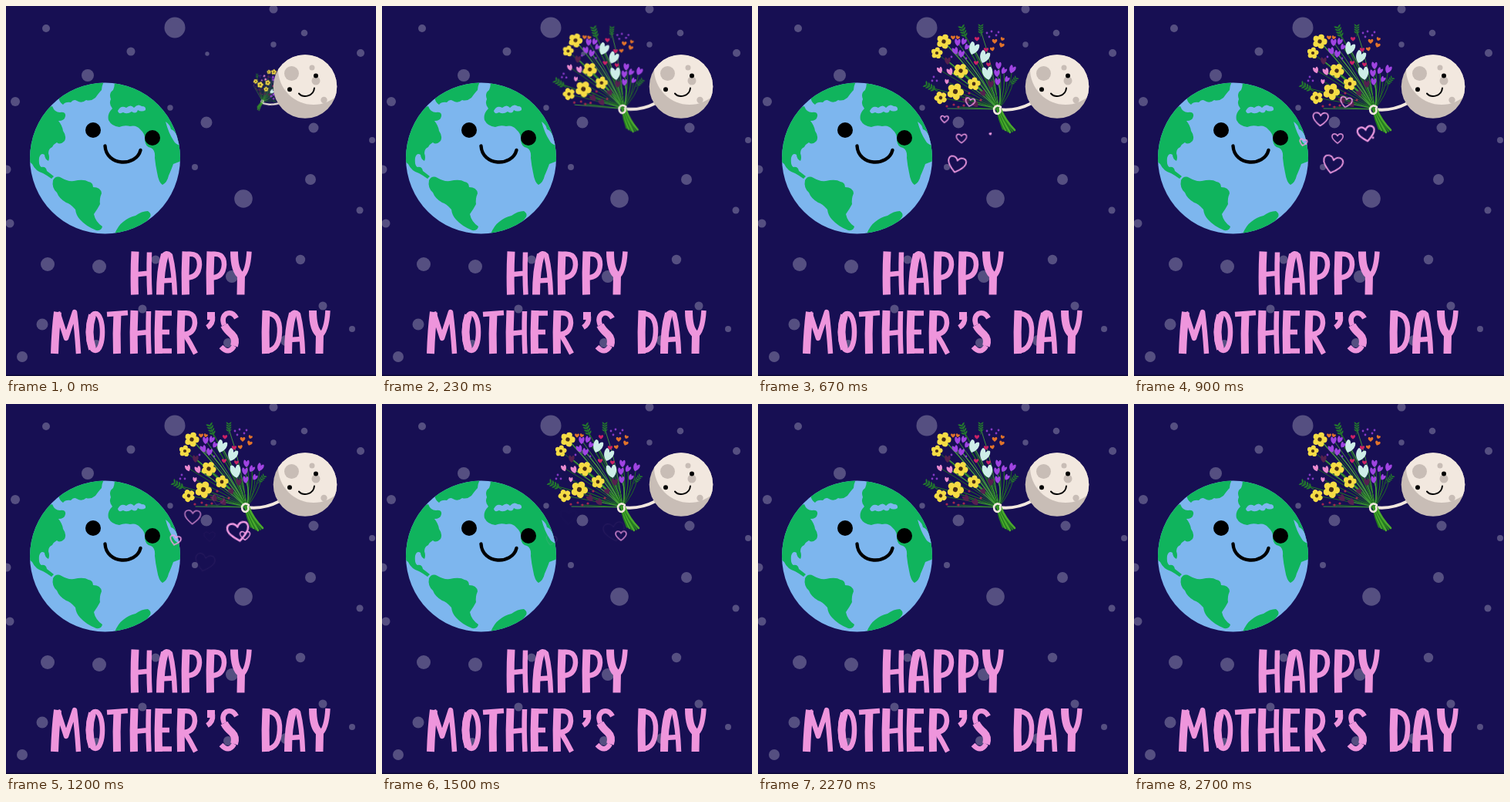
An HTML page for the animation above (2730 ms loop, 480 px wide and 480 px high).

```html
<!DOCTYPE html>
<html lang="en">
<head>
<meta charset="utf-8">
<title>Happy Mother's Day</title>
<style>
  html, body { margin: 0; width: 100%; height: 100%; overflow: hidden; background: #170f53; }
  svg { display: block; width: 100%; height: 100%; }
  .line { fill: none; stroke-linecap: round; stroke-linejoin: round; }
  .bouquet { transform-origin: 312px 134px; animation: present 2730ms infinite; }
  .arm { transform-origin: 354px 126px; animation: reach 2730ms infinite; }
  .heart {
    fill: none; stroke: #f09be3; stroke-linejoin: round; vector-effect: non-scaling-stroke;
    animation: pop 2730ms infinite backwards;
  }
  .lettering path { fill: none; stroke: #ee95dc; stroke-linejoin: round; }
  @keyframes present {
    0% { transform: translate(21px, -10px) rotate(60deg) scale(.36); animation-timing-function: cubic-bezier(.3, .5, .4, 1); }
    12.5%, 100% { transform: none; }
  }
  @keyframes reach {
    0% { transform: rotate(11deg) scale(.5); animation-timing-function: cubic-bezier(.3, .5, .4, 1); }
    12.5%, 100% { transform: none; }
  }
  /* grows for 450 ms, rests, then thins and fades out by 1000 ms */
  @keyframes pop {
    0% { transform: scale(0); opacity: 0; stroke-width: 1.2px; animation-timing-function: cubic-bezier(.333, .667, .667, 1); }
    .4% { opacity: 1; }
    16.5% { transform: none; stroke-width: var(--w); }
    22% { opacity: 1; stroke-width: var(--w); }
    36.6%, 100% { transform: none; opacity: 0; stroke-width: .6px; }
  }
</style>
</head>
<body>
<svg viewBox="0 0 480 480" role="img" aria-label="Happy Mother's Day">
  <defs>
    <clipPath id="globe"><ellipse cx="128.5" cy="197.5" rx="97.5" ry="98"/></clipPath>
    <clipPath id="disc"><circle cx="388" cy="104.5" r="41.3"/></clipPath>
    <path id="heart" d="M0 9C-4 6-10.5 1-10.5-4C-10.5-10-3-11 0-5C3-11 10.5-10 10.5-4C10.5 1 4 6 0 9Z"/>
    <path id="bud" d="M0 10C-8 5-9-4-6-9Q-2-10 0-4Q3-10 6-8C9-3 7 5 0 10Z"/>
    <path id="leaf" d="M0 0Q-5-5 0-12Q5-5 0 0Z"/>
    <g id="sprig"><path d="M0 12V-11" class="line" stroke="currentColor" stroke-width="1.3"/></g>
    <g id="daisy"></g>
  </defs>

  <rect width="480" height="480" fill="#170f53"/>
  <g id="stars" fill="#fff" fill-opacity=".27"></g>
  <rect y="478.5" width="480" height="1.5" fill="#0d0838"/>

  <g clip-path="url(#globe)">
    <rect x="30" y="98" width="198" height="200" fill="#7db6ee"/>
    <g fill="#10b45d">
      <path d="M70 112L98 96L127 98Q124 104 124 109Q121 112 116 119Q110 124 104 122Q98 127 92 123Q88 120 84 125Q77 124 74 128Q69 125 68 118Z"/>
      <path d="M28 140L60 130Q63 138 70 138Q78 137 77 143Q76 149 68 149Q73 155 74 162Q79 169 76 175Q70 181 66 177Q62 179 60 183Q55 185 55 191Q57 197 55 201Q50 198 50 193Q45 190 43 197Q42 207 46 209Q52 208 53 214Q57 217 62 221L59 224Q52 219 48 217Q38 214 34 205L28 200Z"/>
      <path d="M61 226Q65 219 72 223Q80 228 88 227Q101 224 107 228Q113 229 113 235Q123 235 124 243Q121 250 122 257Q119 263 114 270Q116 280 125 286Q124 292 117 291Q104 286 96 277Q91 272 90 264Q83 256 78 255Q69 250 66 242Q59 236 61 226Z"/>
      <path d="M140 96Q142 102 139 109Q133 113 136 121Q133 127 138 133Q131 140 133 148Q137 156 147 157Q154 154 161 156Q169 154 174 160Q181 166 180 174Q181 183 188 184Q194 187 193 197Q194 207 196 216Q198 229 203 232Q209 229 211 220Q215 211 217 205L230 200V120L180 96Z"/>
      <path d="M140 298Q145 285 152 280Q159 274 168 272Q176 266 184 266Q190 270 186 275L172 292Z"/>
    </g>
    <g fill="#7db6ee">
      <path d="M145 136Q149 128 156 132Q162 127 166 132Q171 126 176 130Q182 130 181 135Q176 138 171 135Q169 141 163 137Q157 141 152 138Q146 141 145 136Z"/>
      <path d="M207 150Q213 154 214 160Q218 161 221 167L227 181Q220 180 217 174Q211 165 207 150Z"/>
    </g>
  </g>
  <circle cx="113" cy="161" r="10"/>
  <circle cx="190" cy="171" r="10"/>
  <path class="line" d="M128.5 181.5C130 208 169 209 174.5 187" stroke="#000" stroke-width="4.4"/>

  <path class="line arm" d="M312 134Q334 137 355 126" stroke="#f2e8df" stroke-width="4"/>
  <g class="bouquet" id="bouquet"></g>

  <g clip-path="url(#disc)">
    <rect x="346" y="62" width="84" height="84" fill="#c8bdb6"/>
    <circle cx="399" cy="82" r="46" fill="#f2e8df"/>
    <g fill="#c8bdb6">
      <circle cx="370.5" cy="87.5" r="9.5"/><circle cx="397" cy="80" r="3.5"/>
      <circle cx="402" cy="97" r="5.5"/><circle cx="412.5" cy="122" r="4.2"/>
    </g>
  </g>
  <circle cx="402" cy="90.5" r="3"/>
  <circle cx="368" cy="108.3" r="3"/>
  <path class="line" d="M380 113.5C386 120 399 117 400 106.500" stroke="#000" stroke-width="2"/>

  <g id="hearts"></g>
  <g class="lettering" id="lettering"></g>
</svg>
<script>
const NS = 'http://www.w3.org/2000/svg';
const $ = id => document.getElementById(id);

function add(parent, tag, attrs) {
  const el = document.createElementNS(NS, tag);
  for (const key in attrs) el.setAttribute(key, attrs[key]);
  return parent.appendChild(el);
}
const place = (x, y, turn = 0, scale = 1) => `translate(${x} ${y}) rotate(${turn}) scale(${scale})`;
const dot = (parent, x, y, r, fill) => add(parent, 'circle', fill ? { cx: x, cy: y, r, fill } : { cx: x, cy: y, r });

// Background specks
[[219, 28, 13.5], [347, 4, 5.5], [52, 29, 5], [162, 59, 5.5], [261, 62, 2.7], [347, 50, 3.7],
 [387, 35, 4.3], [460, 61, 5], [106, 90, 8], [12, 124, 6], [260, 151, 7.5], [213, 132, 3.7],
 [399, 158, 6.5], [475, 174, 4], [1, 212, 5.5], [245, 209, 4], [395, 225, 7], [459, 265, 4.5],
 [308, 250, 11.8], [5, 282, 5.5], [54, 335, 9], [121, 338, 9], [382, 329, 6.2], [194, 329, 5.5],
 [293, 351, 8], [177, 393, 5.5], [411, 389, 5.5], [449, 419, 4], [47, 413, 7.5], [21, 455, 7],
 [288, 437, 6], [117, 439, 6], [363, 434, 7]]
  .forEach(([x, y, r]) => dot($('stars'), x, y, r));

// Flower parts
for (let i = 0; i < 5; i++) {
  const a = (i * 72 - 80) * Math.PI / 180;
  dot($('daisy'), 6 * Math.cos(a), 6 * Math.sin(a), 4.1, '#f5dc45');
}
dot($('daisy'), 0, 0, 4.2, '#f5dc45');
dot($('daisy'), 0, 0, 2.8, '#493018');
for (let i = 0; i < 8; i++) {
  add($('sprig'), 'use', {
    href: '#leaf', fill: 'currentColor',
    transform: place(0, 6 - 5 * (i >> 1), i % 2 ? 50 : -50, .65)
  });
}

// Bouquet
const bouquet = $('bouquet');
const part = (id, fill, list) => list.forEach(([x, y, turn, scale]) =>
  add(bouquet, 'use', { href: '#' + id, fill, color: fill, transform: place(x, y, turn, scale) }));

const daisies = [[241, 46, 10, .95], [232, 61, 0, .75], [263, 84, 20, .95],
  [280, 101, 0, .85], [256, 111, 15, 1.1], [237, 119, 40, .82]];
const buds = [[280, 55, 20, .85], [294, 66, 20, .85], [298, 87, -10, .9]];
const violets = [[259, 47, 0, .5], [267, 46, 20, .45], [256, 58, -20, .5], [264, 62, 10, .5],
  [271, 53, 30, .4], [312, 77, 0, .5], [310, 87, 0, .5], [319, 84, 30, .45], [330, 82, 20, .55],
  [311, 98, 0, .48], [323, 95, 30, .4]];
const sprigs = [[267, 35, -20, .75], [289, 32, 0, .6], [225, 106, -60, .75], [331, 98, 40, .55]];
const plums = [[246, 71, 0, .5], [302, 101, 0, .5], [270, 122, -40, .5], [282, 127, -40, .5], [292, 113, -30, .45]];
const pinks = [[236, 83, -20, .45], [249, 85, -20, .5], [245, 98, 0, .35]];

[...daisies, ...buds, ...violets, ...sprigs, ...plums, ...pinks, [258, 131], [246, 133]].forEach(([x, y], i) =>
  add(bouquet, 'path', {
    class: 'line', d: `M${x} ${y}Q${(x + 312) / 2 + 6} ${(y + 134) / 2} 312 134`,
    stroke: i % 3 ? '#237323' : '#47a33a', 'stroke-width': i % 2 ? .9 : 1.2
  }));
for (let i = 0; i < 6; i++) {
  add(bouquet, 'path', {
    class: 'line', d: `M${310 + i} 134Q${313 + i * 1.5} 148 ${318 + i * 3} ${164 - Math.abs(i - 3) * 1.5}`,
    stroke: i % 2 ? '#4aaa2c' : '#247d20', 'stroke-width': 2.6
  });
}
part('sprig', '#247a2d', sprigs);
part('bud', '#56204f', plums);
part('bud', '#a044e2', violets);
part('bud', '#eb8ad0', pinks);
part('heart', '#e2732a', [[307, 46, 0, .32], [316, 51, 20, .32], [304, 56, -10, .28], [317, 43, 20, .25],
  [253, 41, 0, .28], [259, 41, 20, .25]]);
part('bud', '#cdeee8', buds);
part('heart', '#cc2265', [[284, 43, 0, .3], [296, 57, 0, .3], [283, 74, 0, .3], [299, 76, 0, .28]]);
part('daisy', '#f5dc45', daisies);
[[303, 33], [309, 38], [300, 40], [297, 35], [312, 34], [228, 92], [232, 97], [226, 97], [251, 66], [270, 68]]
  .forEach(([x, y]) => dot(bouquet, x, y, 1.4, '#8338c4'));
[[245, 130], [254, 128], [260, 131], [267, 129], [289, 122], [274, 113]]
  .forEach(([x, y]) => dot(bouquet, x, y, 1.6, '#a12650'));
add(bouquet, 'path', { class: 'line', d: 'M315 131Q309 127 306 133Q306 140 311 140Q316 138 314 133', stroke: '#f2e8df', 'stroke-width': 2.6 });

// Hearts: x, y, turn, size, stroke, start in ms
[[264, 172, 0, .68, 1.4, 340], [257.5, 206, 14, 1.2, 1.9, 350], [275, 125, 12, .72, 1.5, 420],
 [242, 147, 3, .97, 1.7, 540], [301.5, 166, -10, 1.3, 2.5, 650], [219.500, 177, 14, .66, 1.6, 700],
 [310, 171, 0, .66, 1.5, 870]]
  .forEach(([x, y, turn, size, width, start]) => {
    const g = add($('hearts'), 'g', { transform: place(x, y, turn, size) });
    add(g, 'path', {
      class: 'heart', d: $('heart').getAttribute('d'),
      style: `--w:${width}px;animation-delay:${start}ms`
    });
  });

// Hand lettering: heavy strokes, then light strokes
const stem = 'M6.500 0Q5 28 6 56';
const glyphs = {
  H: [stem, 'M25 1Q24 30 25.500 56M6 30L25 28'],
  A: ['M5 56Q5 24 11 4', 'M9 6Q13 0 18 5Q23 25 24 56M7 38L23 37'],
  P: [stem, 'M6 4Q24 0 24 17Q23 34 7 34'],
  Y: ['M5 0Q5 25 14 31L13.500 56', 'M24.500 0Q23 27 14 33'],
  M: ['M5 56Q6 25 9 2', 'M9 2L20 36L31 2Q34 25 36 56'],
  O: ['M9 6Q2 28 9 50', 'M13 4C25 4 25 52 13 52C1 52 1 4 13 4Z'],
  T: ['M13.500 3Q12 30 13 56', 'M0 5L27 3'],
  E: [stem, 'M6 3.500H23M6 28H20M6 52.500H23'],
  R: [stem, 'M6 4Q24 0 24 16Q23 31 8 31M11 31Q18 42 25 56'],
  "'": ['M9 2V12', 'M11 8Q12 17 4 22'],
  S: ['M7 19Q10 25 17 31Q23 37 20 46', 'M23 10Q18 1 10 4Q3 9 7 19M20 46Q13 58 3 47'],
  D: [stem, 'M6 4Q25 3 24 28Q23 53 6 52']
};
function write(word, y, starts) {
  [...word].forEach((char, i) => {
    const g = add($('lettering'), 'g', { transform: place(starts[i], y) });
    glyphs[char].forEach((d, light) => add(g, 'path', { d, 'stroke-width': light ? 6.5 : 10 }));
  });
}
write('HAPPY', 318.5, [161, 195, 227, 259, 291]);
write("MOTHER'S", 395, [58, 103, 131, 160, 192, 221, 257, 276]);
write('DAY', 395, [331, 361, 393]);
</script>
</body>
</html>
```
